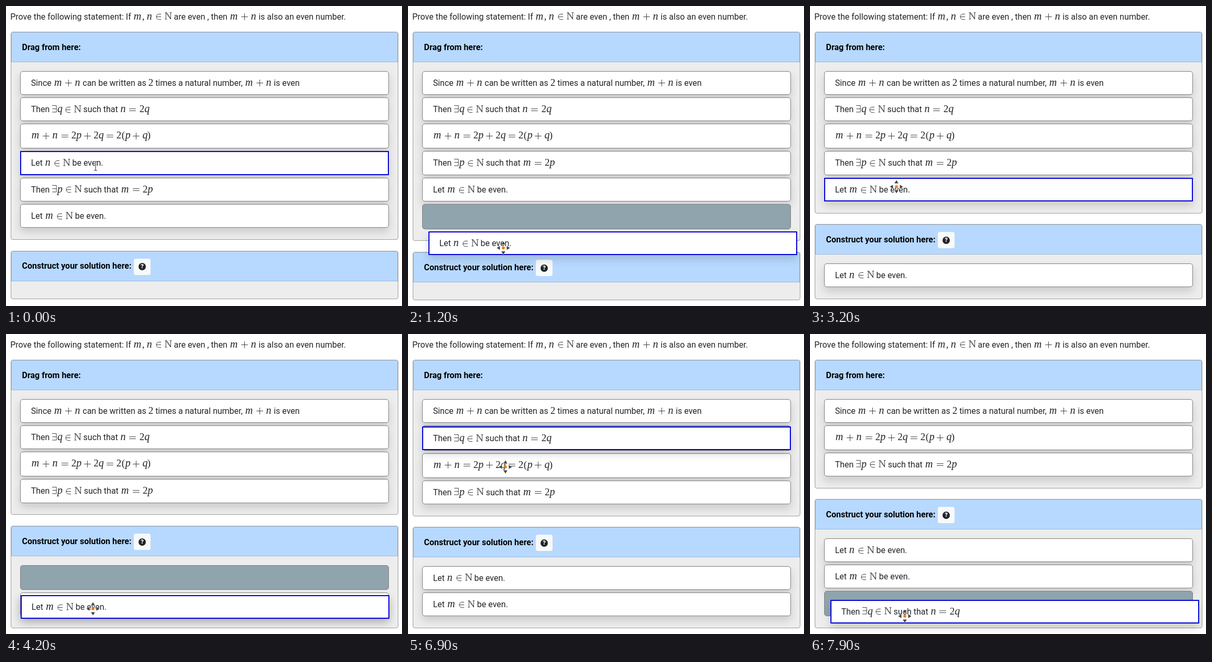
Recreate the animation shown at these times as an HTML page. Size 756 by 571 pixels, loop 8000 ms.

```html
<!DOCTYPE html>
<html lang="en">
<head>
<meta charset="utf-8">
<title>Sort the proof</title>
<style>
  html, body { margin: 0; width: 100%; height: 100%; overflow: hidden; background: #fff; }
  #stage { position: relative; width: 756px; height: 571px; overflow: hidden;
    font: 16px/24px Roboto, sans-serif; color: #212529; }
  #stage * { box-sizing: border-box; }
  .line, .panel, .item, .cursor { position: absolute; white-space: pre; }
  .panel { left: 9px; width: 740px; background: #ededed; border: 1px solid #9c9c9c; border-radius: 4px; }
  .head { height: 57px; background: #b7d9ff; border: 1px solid rgba(0,0,0,.15); border-top-color: rgba(0,0,0,.08);
    border-radius: 3px 3px 0 0; color: #000; font-weight: 700; }
  .head .line { left: 19.5px; top: 15.5px; }
  .help { position: absolute; left: 233px; top: 13px; width: 32px; height: 31px; border-radius: 4px; background: #f8f9fa; }
  .help b { position: absolute; left: 9px; top: 8.5px; width: 14px; height: 14px; border-radius: 50%;
    background: #212529; color: #fff; font: 900 11px/14px Roboto, sans-serif; text-align: center; }
  .item { left: 27px; width: 704px; background: #fff; border: 1px solid #7f7f7f; border-radius: 5px;
    box-shadow: 0 8px 16px rgba(0,0,0,.15); }
  .item .line { left: 19.7px; top: 10px; }
  .item.focus { border: 2px solid #0000d8; border-radius: 0; }
  .item.focus .line { left: 18.7px; top: 9px; }
  .slot { background: #90a4ae; box-shadow: none; }
  .glyph { display: inline-block; text-align: center; font: 19px/0 "Liberation Serif", serif; }
  .var { font-size: 20px; font-style: italic; }
  .sign { vertical-align: -.25em; overflow: visible; fill: none; stroke: #212529; stroke-width: 46; }
  .cursor { z-index: 99; left: 0; top: 0; width: 30px; height: 30px; margin: -15px 0 0 -15px; overflow: visible; }
</style>
</head>
<body>
<div id="stage"></div>
<script>
const stage = document.getElementById('stage');
const EM = 19.1, LOOP = 8000, STEP = 100;

// Advance widths in em
const WIDTH = { m: .878, n: .6, p: .503, q: .446, 2: .5, '(': .389, ')': .389, ',': .278 };
// Drawn signs: width, side gap, outline on a 1000-unit em
const SIGN = {
  '+': [.778, .222, 'M56-250H722M389-583V83'],
  '=': [.778, .278, 'M56-347H722M56-153H722'],
  '∈': [.667, .278, 'M583-520H354C210-520 104-400 104-250S210 20 354 20H583M104-250H583'],
  '∃': [.556, 0, 'M56-674H480V-20H56M75-347H480'],
  'ℕ': [.722, 0, 'M20-665H200L600-75M500-665H702M600-665V-10L120-640V-18M20-18H230']
};

function glyph(c) {
  if (SIGN[c]) {
    const [w, gap, d] = SIGN[c];
    return `<svg class="sign" viewBox="0 -750 ${w * 1000} 1000" style="font-size:${EM}px;height:1em;width:${w}em;margin:0 ${gap}em"><path d="${d}"/></svg>`;
  }
  const gap = c === ',' ? .167 * EM : 0;
  return `<span class="glyph${/[a-z]/.test(c) ? ' var' : ''}" style="width:${WIDTH[c] * EM}px;margin-right:${gap}px">${c}</span>`;
}

// Math sits between dollar signs
const typeset = s => s.split('$').map((part, i) => i % 2 ? [...part].map(glyph).join('') : part).join('');

function add(cls, html, parent = stage) {
  const el = document.createElement('div');
  el.className = cls;
  el.innerHTML = html;
  return parent.appendChild(el);
}

const title = add('line', typeset('Prove the following statement: If $m,n∈ℕ$ are even , then $m+n$ is also an even number.'));
title.style.cssText = 'left:8.2px;top:8.5px';

const panel = (name, extra = '') => add('panel', `<div class="head"><div class="line">${name}</div>${extra}</div>`);
const panels = [panel('Drag from here:'), panel('Construct your solution here:', '<div class="help"><b>?</b></div>')];
for (const head of document.querySelectorAll('.head')) head.style.position = 'relative';

const TEXT = {
  s: 'Since $m+n$ can be written as $2$ times a natural number, $m+n$ is even',
  q: 'Then $∃q∈ℕ$ such that $n=2q$',
  e: '$m+n=2p+2q=2(p+q)$',
  n: 'Let $n∈ℕ$ be even.',
  p: 'Then $∃p∈ℕ$ such that $m=2p$',
  m: 'Let $m∈ℕ$ be even.'
};
const items = { _: add('item slot', '') };
for (const k in TEXT) items[k] = add('item', `<div class="line">${typeset(TEXT[k])}</div>`);
// Lines with descending math are a little taller
const HEIGHT = { s: 45.25, n: 45.25, m: 45.25, q: 45.6, p: 45.6, e: 46.9, _: 47.8 }, GAP = 5;

function cursor(html) {
  const el = document.createElementNS('http://www.w3.org/2000/svg', 'svg');
  el.setAttribute('class', 'cursor');
  el.setAttribute('viewBox', '-15 -15 30 30');
  el.innerHTML = html;
  return stage.appendChild(el);
}
const beam = 'M-3-8.5H-1.2L0-7.5L1.2-8.5H3M0-7.5V7.5M-3 8.5H-1.2L0 7.5L1.2 8.5H3';
const ibeam = cursor(`<g fill="none"><path d="${beam}" stroke="#fff" stroke-width="2.6"/><path d="${beam}" stroke="#333" stroke-width="1.1"/></g>`);
const fleur = cursor([0, 90, 180, 270].map(a =>
  `<path d="M0-12.5L3.8-6.5H-3.8Z" transform="rotate(${a})" fill="#444" stroke="#fff" stroke-width="1" paint-order="stroke"/>`).join('') +
  '<circle r="2.8" fill="#f57900"/>');

// Time, first list, second list, focused item ("_" is the drop slot)
const STATES = [
  [0, 'sqenpm', '', 'n'], [500, 'sqe_pm', '', 'n'], [700, 'sqep_m', '', 'n'], [900, 'sqepm_', '', 'n'],
  [1600, 'sqepm', '_', 'n'], [2100, 'sqepm', 'n', 'n'], [2400, 'sqepm', 'n', ''], [3200, 'sqepm', 'n', 'm'],
  [3700, 'sqep_', 'n', 'm'], [4000, 'sqep', '_n', 'm'], [4400, 'sqep', 'n_', 'm'], [4700, 'sqep', 'nm', 'm'],
  [5100, 'sqep', 'nm', ''], [5900, 'sqep', 'nm', 'q'], [6900, 's_ep', 'nm', 'q'], [7100, 'se_p', 'nm', 'q'],
  [7200, 'sep_', 'nm', 'q'], [7300, 'sep', '_nm', 'q'], [7500, 'sep', 'n_m', 'q'], [7600, 'sep', 'nm_', 'q']
];
// Time, x, y of the pointer
const TRACK = [
  [0, 171, 304.5], [400, 171, 304.5], [500, 173, 318], [1200, 182, 460.5], [1300, 184, 482], [1700, 188, 530],
  [2100, 188, 544], [2300, 188, 544], [2600, 190, 434], [3100, 190, 434], [3200, 165, 344], [3600, 165, 344],
  [3700, 165, 352], [4000, 166, 475], [4200, 166, 523], [4500, 167, 536], [5000, 167, 536], [5100, 191.5, 385],
  [5900, 170.5, 217.5], [6200, 170.5, 217.5], [6600, 170, 205], [6800, 170, 205], [6900, 186, 253],
  [7300, 184, 410], [7700, 181, 527], [7900, 181, 537]
];
const BEAM_TIMES = [[0, 100], [2100, 3200], [4700, 6100]];
// Start of drag, then the pointer's hold on the item
const GRAB = { n: [500, 170, 31.4], m: [3700, 165, 26], q: [6900, 169, 31.2] };

function pointer(t) {
  const i = TRACK.findIndex(k => k[0] > t);
  if (i < 0) return TRACK[TRACK.length - 1].slice(1);
  const [t0, x0, y0] = TRACK[i - 1], [t1, x1, y1] = TRACK[i];
  const f = (t - t0) / (t1 - t0);
  return [x0 + (x1 - x0) * f, y0 + (y1 - y0) * f];
}

function place(el, x, y, h, z) {
  Object.assign(el.style, { left: x + 'px', top: y + 'px', height: h + 'px', zIndex: z });
}

function render(t) {
  const state = STATES.filter(s => s[0] <= t).pop();
  const lists = [state[1], state[2]], focus = state[3];
  const [cx, cy] = pointer(t);
  let top = 49.1, z = 1, slotY = null;

  lists.forEach((list, i) => {
    let y = top + 74.5;
    for (const k of list) {
      place(items[k], 27, y, HEIGHT[k], ++z);
      if (k === '_') slotY = y;
      y += HEIGHT[k] + GAP;
    }
    y += 17.5;
    place(panels[i], 9, top, y - top, 0);
    top = y + 20.6;
  });

  for (const k in items) items[k].classList.toggle('focus', k === focus);
  const dragging = slotY !== null;
  items._.style.display = dragging ? '' : 'none';
  if (dragging) {
    const [start, gx, gy] = GRAB[focus];
    const waiting = t === start;
    place(items[focus], waiting ? 27 : 27 + cx - gx, waiting ? slotY + 2 : cy - gy, HEIGHT[focus], 50);
  }

  const isBeam = BEAM_TIMES.some(([a, b]) => t >= a && t < b);
  ibeam.style.display = isBeam ? '' : 'none';
  fleur.style.display = isBeam ? 'none' : '';
  for (const c of [ibeam, fleur]) c.style.transform = `translate(${cx}px,${cy}px)`;
}

let begin = null, last = -1;
function tick(now) {
  if (begin === null) begin = now;
  const t = Math.floor((now - begin) % LOOP / STEP) * STEP;
  if (t !== last) render(last = t);
  requestAnimationFrame(tick);
}
render(0);
requestAnimationFrame(tick);
</script>
</body>
</html>
```
